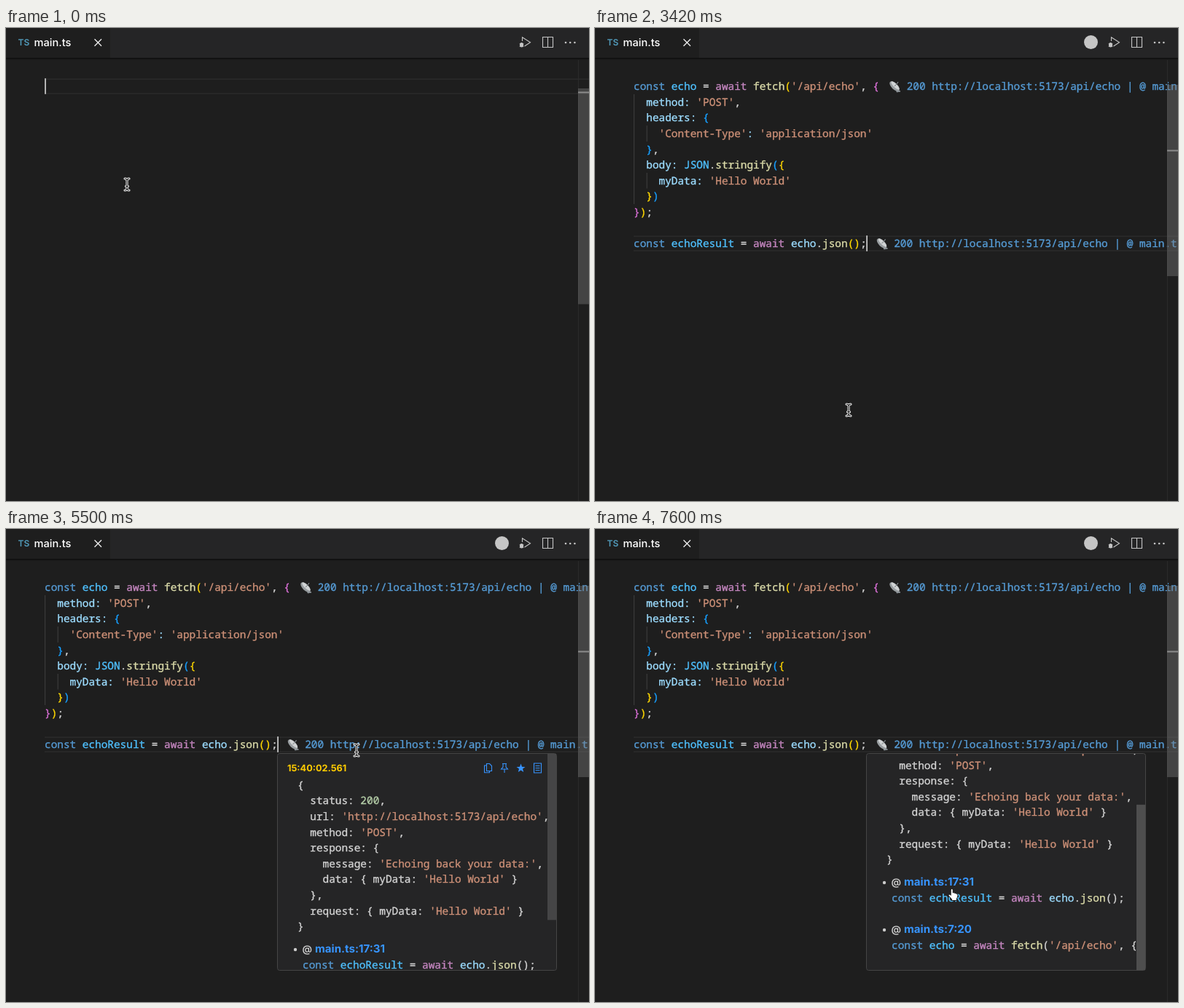
An HTML page that plays this animation: 800x650 px, repeating every 8000 ms.

```html
<!DOCTYPE html>
<html lang="en">
<head>
<meta charset="utf-8">
<title>Editor hover</title>
<style>
  html, body { margin: 0; width: 100%; height: 100%; overflow: hidden; background: #1e1e1e; }
  svg { display: block; width: 800px; height: 650px; }
  text { white-space: pre; text-rendering: geometricPrecision; }
  .code { font: 14.4px "Noto Sans Mono", "DejaVu Sans Mono", monospace; stroke-width: .35; }
  .ui { font-family: Inter, "Liberation Sans", sans-serif; }
  .line { fill: none; stroke: #c5c5c5; stroke-width: 1.1; }
  .blue { fill: none; stroke: #3794ff; stroke-width: 1.1; }
</style>
</head>
<body>
<svg viewBox="0 0 800 650">
  <defs>
    <clipPath id="inside"><rect x="373" y="309" width="382" height="297"/></clipPath>
    <linearGradient id="shade" x2="0" y2="1">
      <stop offset="0" stop-color="#0c0c0c"/>
      <stop offset="1" stop-color="#1e1e1e"/>
    </linearGradient>
    <g id="dish">
      <path d="M4 4L11 -6M9 5L14 7L9 8Z" stroke="#8d9499" fill="#8d9499"/>
      <ellipse cx="6" cy="0" rx="8.6" ry="4.2" transform="rotate(45 6 0)" fill="#989da0"/>
      <ellipse cx="7" cy="-1" rx="7.6" ry="2.4" transform="rotate(45 7 -1)" fill="#d0d3d4"/>
      <path d="M6 0L11 -5" stroke="#6f7579"/>
    </g>
  </defs>

  <rect width="800" height="650" fill="#1e1e1e"/>
  <g id="current" fill="#2a2a2a">
    <rect x="53" y="69.5" width="747" height="1.6"/>
    <rect x="53" y="89.3" width="747" height="1.6"/>
  </g>
  <g id="code">
    <path d="M53.6 91V242M71.2 134V156M71.2 199V220.5" stroke="#404040"/>
  </g>
  <g id="notes"></g>
  <rect id="caret" width="1.8" height="21.6" fill="#c4c4c4"/>

  <path d="M785.5 42V650" stroke="#2b2b2b"/>
  <rect id="bar" x="785" width="15" fill="#797979" opacity=".42"/>
  <rect id="mark" x="785" width="15" height="2" fill="#8c8c8c"/>

  <rect width="800" height="41" fill="#252526"/>
  <rect width="143" height="41" fill="#1e1e1e"/>
  <rect y="41" width="800" height="3" fill="url(#shade)"/>
  <text class="ui" x="16.5" y="24.3" font-size="12" font-weight="600" fill="#519aba">TS</text>
  <text class="ui" x="38.6" y="25.2" font-size="14.6" font-weight="500" fill="#fff">main.ts</text>
  <path id="close" d="M121.5 15.2L131 24.7M131 15.2L121.5 24.7" stroke="#f0f0f0" stroke-width="1.3"/>
  <circle id="dirty" cx="126.3" cy="20" r="5" fill="#fff"/>

  <circle id="badge" cx="680.5" cy="19.5" r="9.5" fill="#c5c5c5"/>
  <path class="line" d="M708.5 18V12.8L719.5 19.8L711.5 25"/>
  <ellipse cx="707.5" cy="23.3" rx="2.4" ry="3.3" fill="#c5c5c5"/>
  <path class="line" d="M704.8 21.5L710.2 25.5M710.2 21.5L704.8 25.5" stroke-width=".7"/>
  <path class="line" d="M736.5 12.5H750.5V26.5H736.5ZM743.5 12.5V26.5"/>
  <g fill="#c5c5c5">
    <circle cx="768" cy="20" r="1.3"/><circle cx="774.2" cy="20" r="1.3"/><circle cx="780.4" cy="20" r="1.3"/>
  </g>

  <g id="hover">
    <rect x="372.5" y="308.5" width="383" height="298" rx="3" fill="#252526" stroke="#454545"/>
    <g clip-path="url(#inside)">
      <g id="body">
        <text class="ui" x="386" y="332.6" font-size="12.7" font-weight="700" fill="#fc0">15:40:02.561</text>
        <path class="blue" d="M659.5 322.5H663.5L666.5 325.5V332.5H659.5ZM659 325H656.5V334.8H663.5V333"/>
        <path class="blue" d="M681 322.5H687M682 322.5V327L679.5 330H688.5L686 327V322.5M684 330V335"/>
        <path id="star" fill="#3794ff"/>
        <path class="blue" d="M724.5 322H734.5V335H724.5ZM726.5 325.5H732.5M726.5 328.5H732.5M726.5 331.5H732.5"/>
      </g>
      <rect id="thumb" x="743" y="308" width="12.5" height="229.3" fill="#4e4e4e"/>
    </g>
  </g>

  <g id="mouse" stroke-linejoin="round" stroke-linecap="round">
    <g id="beam" fill="none">
      <path d="M-3 -8Q0 -8 0 -5.5Q0 -8 3 -8M0 -5.5V5.5M-3 8Q0 8 0 5.5Q0 8 3 8M-1.5 2.5H1.5" stroke="#fff" stroke-width="3"/>
      <path d="M-3 -8Q0 -8 0 -5.5Q0 -8 3 -8M0 -5.5V5.5M-3 8Q0 8 0 5.5Q0 8 3 8M-1.5 2.5H1.5" stroke="#111" stroke-width="1.1"/>
    </g>
    <path id="arrow" d="M.5 .5V13.6L3.6 10.8L5.8 16L8.2 15L6 9.9H10.3Z" fill="#111" stroke="#fff" stroke-width="1.1"/>
    <path id="hand" d="M-1.5 8V1Q-1.5 -.6 0 -.6T1.5 1V5Q3 4 4 5.5Q5.5 4.8 6.3 6.3Q8.3 6 8.2 8.5Q8.2 11 6.6 13V15.5H-.2V13.8L-4.6 8.8Q-4.8 6.5 -3 7Z" fill="#fff" stroke="#111" stroke-width=".9"/>
  </g>
</svg>

<script>
const LOOP = 8000, LINE = 21.6;
const $ = id => document.getElementById(id);
const show = (id, on) => $(id).style.display = on ? '' : 'none';

function add(parent, tag, attrs, text = '') {
  const el = document.createElementNS('http://www.w3.org/2000/svg', tag);
  for (const key in attrs) el.setAttribute(key, attrs[key]);
  el.textContent = text;
  parent.append(el);
  return el;
}

// "~x" starts a run of text in the colour named x
const COLORS = {
  p: '#d4d4d4', k: '#569cd6', c: '#4fc1ff', v: '#9cdcfe', a: '#c586c0',
  f: '#dcdcaa', s: '#ce9178', n: '#b5cea8', g: '#ffd700', m: '#da70d6', b: '#179fff'
};
function write(parent, x, mid, source) {
  const el = add(parent, 'text', { class: 'code', x, y: mid + 5.2 });
  for (const run of source.split('~').slice(1)) {
    const color = COLORS[run[0]];
    add(el, 'tspan', { fill: color, stroke: color }, run.slice(1));
  }
}
const writeAll = (parent, x, mid, lines) =>
  lines.forEach((s, i) => s && write(parent, x, mid + i * LINE, s));

writeAll($('code'), 53, 80, [
  "~kconst ~cecho ~p= ~aawait ~ffetch~g(~s'/api/echo'~p, ~m{",
  "~v  method: ~s'POST'~p,",
  "~v  headers: ~b{",
  "~s    'Content-Type'~v: ~s'application/json'",
  "~b  }~p,",
  "~v  body: ~cJSON~p.~fstringify~b(~g{",
  "~v    myData: ~s'Hello World'",
  "~g  }~b)",
  "~m}~g)~p;",
  "",
  "~kconst ~cechoResult ~p= ~aawait ~vecho~p.~fjson~g()~p;"
]);

for (const [x, mid] of [[405, 80], [387.5, 296]]) {
  add($('notes'), 'use', { href: '#dish', x, y: mid });
  write($('notes'), x + 22.7, mid, '~k200 http://localhost:5173/api/echo | @ main.ts:17:31');
}

const body = $('body');
writeAll(body, 400, 351.6, [
  "~p{",
  "~p  status: ~n200~p,",
  "~p  url: ~s'http://localhost:5173/api/echo'~p,",
  "~p  method: ~s'POST'~p,",
  "~p  response: {",
  "~p    message: ~s'Echoing back your data:'~p,",
  "~p    data: { myData: ~s'Hello World'~p }",
  "~p  },",
  "~p  request: { myData: ~s'Hello World'~p }",
  "~p}"
]);
const PLACES = [
  [577.3, 'main.ts:17:31', "~kconst ~cechoResult ~p= ~aawait ~vecho~p.~fjson~p();"],
  [642.3, 'main.ts:7:20', "~kconst ~cecho ~p= ~aawait ~ffetch~p(~s'/api/echo'~p, {"]
];
for (const [y, place, code] of PLACES) {
  const font = { class: 'ui', y: y + 5 };
  add(body, 'circle', { cx: 397, cy: y + .7, r: 2.2, fill: '#ccc' });
  add(body, 'text', { ...font, x: 406.5, 'font-size': 13.5, 'font-weight': 600, fill: '#d4d4d4' }, '@');
  add(body, 'text', { ...font, x: 424, 'font-size': 15.1, 'font-weight': 700, fill: '#3794ff' }, place);
  write(body, 407, y + 21.5, code);
}

const star = Array.from({ length: 10 }, (_, i) => {
  const r = i % 2 ? 2.6 : 6.3, a = i * Math.PI / 5;
  return (706.5 + r * Math.sin(a)).toFixed(1) + ' ' + (328.8 - r * Math.cos(a)).toFixed(1);
});
$('star').setAttribute('d', 'M' + star.join('L') + 'Z');

// time, x, y, pointer shape
const MOUSE = [
  [0, 166, 215, 'beam'], [150, 167, 225.3, 'beam'],
  [1490, 178, 246, 'beam'], [1630, 226, 329, 'beam'], [1780, 286, 434, 'beam'],
  [1930, 325, 501, 'beam'], [2070, 336, 521, 'beam'],
  [3420, 348, 525, 'beam'], [3560, 362, 505, 'beam'], [3710, 388, 466, 'beam'],
  [3860, 420, 405, 'beam'], [4010, 450, 348, 'beam'], [4160, 472, 311, 'beam'],
  [4310, 480, 299, 'beam'],
  [5500, 481, 304, 'beam'], [5650, 484, 335, 'arrow'], [5800, 486, 372, 'arrow'],
  [5950, 487, 396, 'arrow'], [6100, 487.3, 410, 'arrow'], [6250, 487.6, 434, 'arrow'],
  [6400, 488, 474, 'arrow'], [6550, 488.3, 492, 'arrow'], [7150, 489.7, 495, 'hand']
];
const SCROLL = [[0, 0], [6850, 12], [7000, 50], [7150, 92]];
const FADE = [[0, 0], [4610, .87], [4760, 1]];
const THUMB = [[0, 1], [5500, .8], [5650, 1]];
const TICKS = [...MOUSE.map(m => m[0]),
  600, 1200, 2670, 2970, 3120, 4610, 4760, 5060, 6850, 7000, 7600].sort((a, b) => a - b);

const at = (table, t) => table.findLast(row => row[0] <= t);

function draw(t) {
  const pasted = t >= 1200, saved = t >= 2670;
  const caretOn = pasted ? (t - 30) % 1000 < 500 : t < 150 || t >= 600;
  show('code', pasted);
  show('caret', caretOn);
  $('caret').setAttribute('x', pasted ? 372.2 : 53.1);
  $('caret').setAttribute('y', pasted ? 285.2 : 69.2);
  $('current').setAttribute('transform', `translate(0 ${pasted ? 216 : 0})`);
  $('bar').setAttribute('y', pasted ? 78 : 83);
  $('bar').setAttribute('height', pasted ? 263 : 296.5);
  $('mark').setAttribute('y', pasted ? 167.5 : 87.5);
  show('dirty', pasted && !saved);
  show('close', !pasted || saved);
  show('notes', t >= 2970);
  show('badge', t >= 3120);

  const scroll = at(SCROLL, t)[1];
  $('hover').setAttribute('opacity', at(FADE, t)[1]);
  $('thumb').setAttribute('opacity', at(THUMB, t)[1]);
  body.setAttribute('transform', `translate(0 ${-scroll})`);
  $('thumb').setAttribute('y', 308 + scroll * .77);

  const [, x, y, shape] = at(MOUSE, t);
  $('mouse').setAttribute('transform', `translate(${x} ${y})`);
  for (const id of ['beam', 'arrow', 'hand']) show(id, id === shape);
}

let last = -1;
function frame() {
  const now = performance.now() % LOOP;
  const tick = TICKS.findLast(t => t <= now);
  if (tick !== last) draw(last = tick);
  requestAnimationFrame(frame);
}
frame();
</script>
</body>
</html>
```
